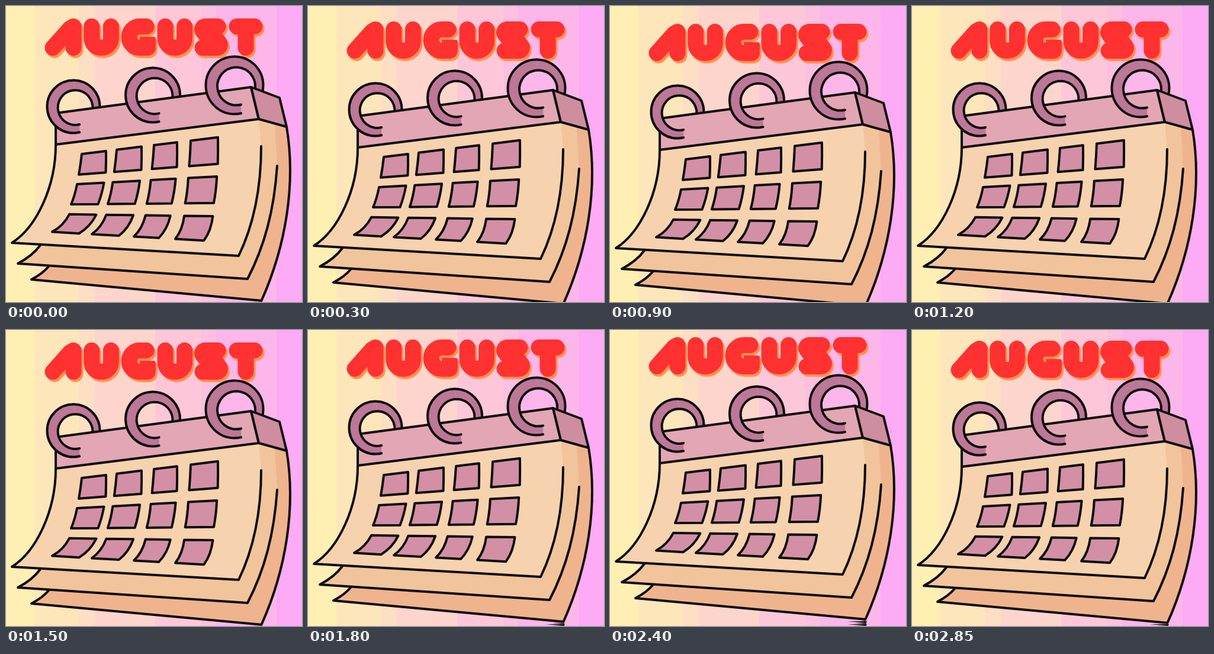
An HTML page with a canvas for the animation above (3000 ms loop, 500 px wide and 500 px high).

```html
<!DOCTYPE html>
<html lang="en">
<head>
<meta charset="utf-8">
<title>August</title>
<style>
html, body { margin: 0; width: 100%; height: 100%; overflow: hidden; }
canvas { display: block; width: 100vw; height: 100vh; }
</style>
</head>
<body>
<canvas id="stage" width="500" height="500" role="img" aria-label="AUGUST calendar"></canvas>
<script>
const SIZE = 500, STEP = 150, STEPS = 20, SWING = 10;
const INK = '#0d0d0d', RING = '#bd7797', TILE = '#d38fa5';
const ctx = document.getElementById('stage').getContext('2d');

// Left edges of the flat bands that make up the backdrop gradient.
const BANDS = [0, 48, 123, 150, 252, 330, 355, 457, SIZE];
const YELLOW = [255, 243, 175], PINK = [252, 168, 247];

// Sheets from back to front: ink line, point under the header, colour.
const SHEETS = [
  ['M72 440Q62 452 43 462L431.5 497.8C473 405 490 300 474 204', '474 204', '#efb48e'],
  ['M58 404Q45 422 20 435L408 461C437 405 453 345 458 270', '454 199', '#f1c49c'],
  ['M84 234C84 306 51 374 10 400L393 422C421 364 431 300 431 237', '427 191', '#f6d3ae']
];
const HEADER = [
  ['M84 181L414 137L427 191L84 234Z', '#e3a6b4'],
  ['M414 137L462 155L474 204L427 191Z', '#cf8da0']
];
const RINGS = [[114, 170, 44.5], [248, 150.5, 46], [386, 134, 48.5]];

// Day grid: left and right of each column, then height and
// leftward slant of the top and bottom edge of each row.
const COLS = [[128, 169], [187, 229], [250, 289], [312, 358]];
const ROWS = [[[251, 0], [285, 5]], [[301, 8], [335, 18]], [[352, 21], [384, 50]]];

// Fat strokes spelling AUGUST.
const U = x => `M${x} 34.5V54.5A16.3 16 0 0 0 ${x + 32.6} 54.5V34.5`;
const WORD = new Path2D(
  'M79 70.5L108 38L114 34.5V70.5' + U(144.7) +
  'M237 34.5H226A18 18 0 0 0 226 70.5H238' + U(269) +
  'M358 34.5H338M332 70.5H355M390 34.5H420M405 40V70.5');
const G_BAR = new Path2D('M226 52H249Q253 52 253 56V68Q253 84 237 84H226Z');
const S_BODY = new Path2D('M336.5 39.5L356.5 65.5');

function stroke(path, width = 4, color = INK) {
  ctx.lineWidth = width;
  ctx.strokeStyle = color;
  ctx.stroke(path);
}

function shape(d, color, line = d) {
  ctx.fillStyle = color;
  ctx.fill(new Path2D(d));
  stroke(new Path2D(line));
}

function backdrop() {
  BANDS.slice(0, -1).forEach((x, i) => {
    const mid = (x + BANDS[i + 1]) / 2 / SIZE;
    ctx.fillStyle = `rgb(${YELLOW.map((c, k) => Math.round(c + (PINK[k] - c) * mid))})`;
    ctx.fillRect(x, 0, SIZE - x, SIZE);
  });
}

function word(dx, dy, color) {
  ctx.save();
  ctx.translate(dx, dy);
  stroke(WORD, 27, color);
  stroke(S_BODY, 37, color);
  ctx.fillStyle = color;
  ctx.fill(G_BAR);
  ctx.restore();
}

// The back half dips behind the header, the front half ends in an open tail.
function ring([x, y, R], front) {
  const top = -Math.PI / 2, r = R * 0.66, dx = 3, dy = 1.5, tail = R * 0.23;
  const a = front ? Math.acos(tail / R) : 0.25;
  const b = front ? Math.acos((tail - dx) / r) : 0.25;
  const band = new Path2D(), outer = new Path2D(), inner = new Path2D();
  outer.arc(x, y, R, top, a, front);
  inner.arc(x + dx, y + dy, r, b, top, !front);
  band.arc(x, y, R, top, a, front);
  band.arc(x + dx, y + dy, r, b, top, !front);
  ctx.fillStyle = RING;
  ctx.fill(band);
  stroke(outer);
  stroke(inner);
}

function tile(col, row) {
  const bow = 0.5 * 3 ** row;
  const [left, right] = COLS[col];
  const corner = (x, [y, slant], slack) => {
    const px = x - Math.max(0, slant - slack) * (1 - 0.16 * col);
    return [px, y + (px - 120) * (y - 342) * 0.00135];
  };
  const bend = ([x1, y1], [x2, y2]) =>
    `Q${(x1 + x2) / 2 + bow} ${(y1 + y2) / 2 + bow} ${x2} ${y2}`;
  const [tl, bl] = ROWS[row].map(edge => corner(left, edge, 0));
  const [tr, br] = ROWS[row].map(edge => corner(right, edge, 4.5));
  shape(`M${tl}L${tr}${bend(tr, br)}L${bl}${bend(bl, tl)}Z`, TILE);
}

function scene(dy) {
  ctx.save();
  ctx.beginPath();
  ctx.rect(0, 0, SIZE, SIZE + dy);
  ctx.clip();
  backdrop();
  ctx.translate(0, dy);
  ctx.lineCap = ctx.lineJoin = 'round';
  word(3, 4, '#ff914d');
  word(0, 0, '#ff3131');
  SHEETS.forEach(([line, top, color]) => shape(`${line}L${top}L427 191Z`, color, line));
  RINGS.forEach(r => ring(r, false));
  HEADER.forEach(([d, color]) => shape(d, color));
  ROWS.forEach((_, row) => COLS.forEach((_, col) => tile(col, row)));
  RINGS.forEach(r => ring(r, true));
  ctx.restore();
}

const shift = step => Math.trunc(SWING * Math.sin(2 * Math.PI * step / STEPS));

// Above the rest position the uncovered bottom rows keep what was there,
// so the rise is replayed up to the current height.
function draw(step) {
  const half = STEPS / 2;
  if (step < half) return scene(shift(step));
  const last = Math.min(step, STEPS + half - step);
  for (let s = half; s <= last; s++) scene(shift(s));
}

let shown = -1;
function tick(now) {
  const step = Math.floor(now / STEP) % STEPS;
  if (step !== shown) draw(shown = step);
  requestAnimationFrame(tick);
}
tick(performance.now());
</script>
</body>
</html>
```
